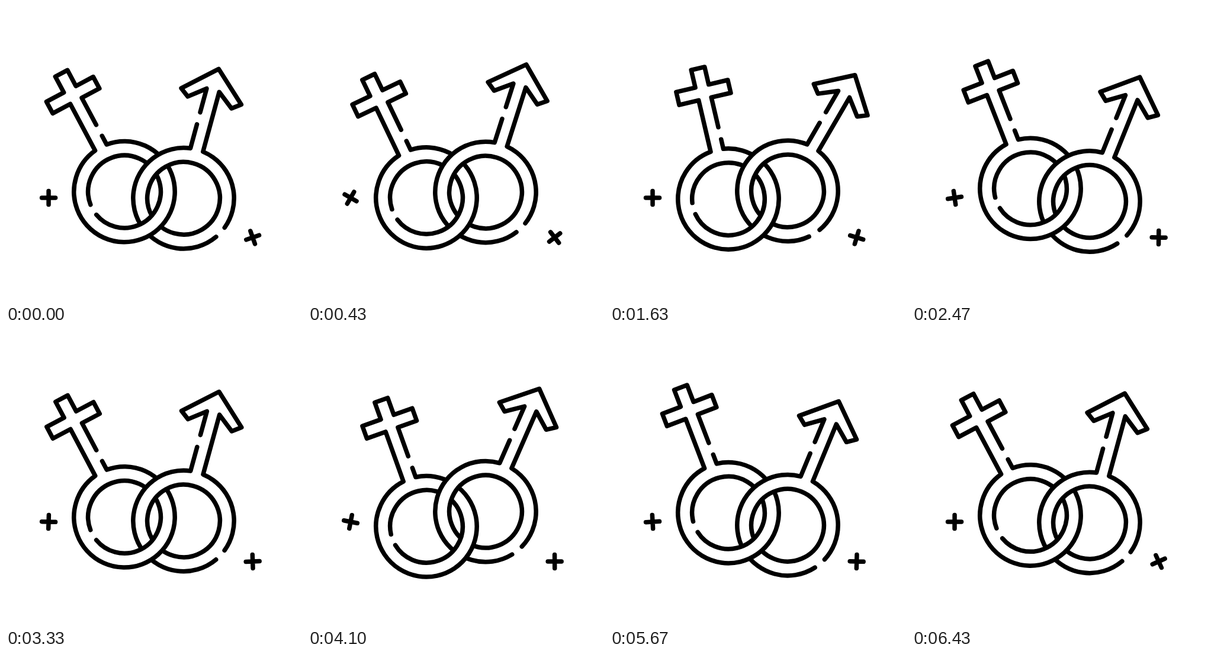
These frames come from a looping animation (500 by 500 pixels, 6460 ms). An HTML page with a canvas:

```html
<!DOCTYPE html>
<html lang="en">
<head>
<meta charset="utf-8">
<title>Linked rings</title>
<style>
  html, body { margin: 0; width: 100%; height: 100%; overflow: hidden; background: #fff; }
  canvas { display: block; width: 500px; height: 500px; }
</style>
</head>
<body>
<canvas id="stage" width="500" height="500"></canvas>
<script>
const ctx = document.getElementById('stage').getContext('2d');
const PERIOD = 3230;
const WEIGHT = 7.5;
const R = 85.2, INNER = 61.3, MID_Y = 319;
const HALF = 11, FOOT = Math.sqrt(R * R - HALF * HALF);
const rad = deg => deg * Math.PI / 180;
const OPEN = Math.asin(HALF / R);
const ARC_START = -Math.PI / 2 + OPEN, ARC_END = Math.PI * 1.5 - OPEN;

function line(points) {
  for (const [x, y] of points) ctx.lineTo(x, y);
}

function place(x, y, deg, draw) {
  ctx.save();
  ctx.translate(x, y);
  ctx.rotate(rad(deg));
  draw();
  ctx.restore();
}

function ink() {
  ctx.lineWidth = WEIGHT;
  ctx.strokeStyle = '#000';
  ctx.stroke();
}

// White body of a ring, hiding whatever passes beneath it
function band() {
  ctx.beginPath();
  ctx.arc(0, 0, (R + INNER) / 2, 0, Math.PI * 2);
  ctx.lineWidth = R - INNER;
  ctx.strokeStyle = '#fff';
  ctx.stroke();
}

function female() {
  band();
  ctx.beginPath();
  ctx.moveTo(HALF, -101);
  ctx.lineTo(HALF, -FOOT);
  ctx.arc(0, 0, R, ARC_START, ARC_END);
  line([[-HALF, -173.7], [-44.7, -173.7], [-44.7, -196], [-11.6, -196],
        [-11.6, -226.4], [11.6, -226.4], [11.6, -196], [44.7, -196],
        [44.7, -173.7], [HALF, -173.7], [HALF, -122]]);
  ctx.moveTo(INNER * Math.cos(rad(187)), INNER * Math.sin(rad(187)));
  ctx.arc(0, 0, INNER, rad(187), rad(528.5));
  ink();
}

function male() {
  band();
  ctx.beginPath();
  ctx.arc(0, 0, R, rad(20.4), ARC_START, true);
  line([[HALF, -189], [38.3, -167.7], [52.5, -178.3], [0, -226.3],
        [-52.5, -178.3], [-38.3, -167.7], [-HALF, -189], [-HALF, -147.5]]);
  ctx.moveTo(-HALF, -126.5);
  ctx.lineTo(-HALF, -FOOT);
  ctx.arc(0, 0, R, ARC_END, rad(34.7), true);
  ctx.moveTo(INNER, 0);
  ctx.arc(0, 0, INNER, 0, Math.PI * 2);
  ink();
}

function plus() {
  ctx.beginPath();
  ctx.moveTo(-11.5, 0);
  ctx.lineTo(11.5, 0);
  ctx.moveTo(0, -11.5);
  ctx.lineTo(0, 11.5);
  ink();
}

function within(top, height, draw) {
  ctx.save();
  ctx.beginPath();
  ctx.rect(0, top, 500, height);
  ctx.clip();
  draw();
  ctx.restore();
}

function render(time) {
  const phase = time % PERIOD / PERIOD * Math.PI * 2;
  const swing = Math.cos(phase);
  const bob = 12.8 * Math.sin(phase - rad(30));
  const left = () => place(200, 320 + bob, -20.6 - 7.45 * swing, female);
  const right = () => place(300, 318.4 - bob, 22.7 - 7.5 * swing, male);

  ctx.fillStyle = '#fff';
  ctx.fillRect(0, 0, 500, 500);
  ctx.lineCap = ctx.lineJoin = 'round';

  // The right ring lies on top in the upper half, the left one in the lower
  within(0, MID_Y, () => { left(); right(); });
  within(MID_Y, 500 - MID_Y, () => { right(); left(); });

  place(72, 324, -90 * swing, plus);
  place(416.7, 391, 90 * Math.sin(phase - rad(12.5)), plus);
}

const start = performance.now();
function tick() {
  render(performance.now() - start);
  requestAnimationFrame(tick);
}
tick();
</script>
</body>
</html>
```
